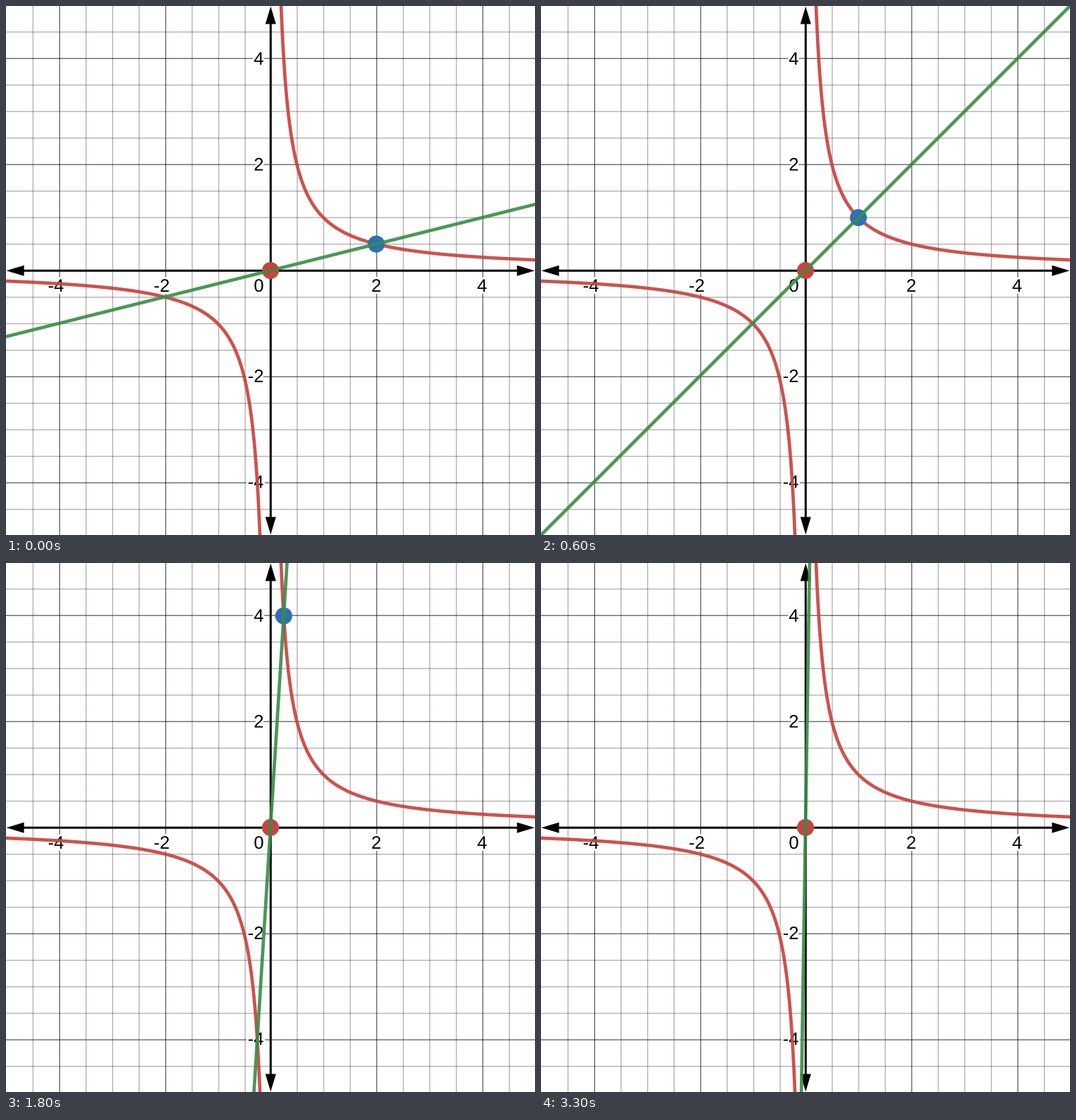
These frames come from a looping animation (748x748 px, 3900 ms). A matplotlib script:

```python
import math

import numpy as np
import matplotlib.pyplot as plt
from matplotlib.animation import FuncAnimation
from matplotlib.patches import Circle, Polygon
from matplotlib.patheffects import withStroke

SIZE, DPI = 748, 100
MID = SIZE / 2
UNIT = SIZE / 10
SCALE = 1.5  # device pixels per layout pixel
AXIS = 249.5 * SCALE
RED, BLUE, GREEN = "#c74440", "#2d70b3", "#388c46"
SLOPES = [0.25, 1, 4, 16, 64]

plt.rcParams["text.hinting"] = "none"


def pt(px):
    """Pixels to typographic points."""
    return px * 72 / DPI


def to_px(x, y):
    return MID + UNIT * x, MID - UNIT * y


fig = plt.figure(figsize=(SIZE / DPI, SIZE / DPI), dpi=DPI, facecolor="white")
ax = fig.add_axes([0, 0, 1, 1])
ax.set(xlim=(0, SIZE), ylim=(SIZE, 0))
ax.axis("off")


def stroke(xs, ys, color, width, z, alpha=1.0):
    line, = ax.plot(xs, ys, color=color, lw=pt(width), alpha=alpha, zorder=z,
                    snap=False, solid_capstyle="butt", solid_joinstyle="round")
    return line


def draw_grid():
    for k in range(1, 10):
        alpha = 0.55 if k % 4 == 0 else 0.28
        step = 25 * k
        for x in (250.5 - step, 249.5 + step):
            stroke([x * SCALE] * 2, [0, SIZE], "black", SCALE, 1, alpha)
        for y in (249.5 - step, 249.5 + step):
            stroke([0, SIZE], [y * SCALE] * 2, "black", SCALE, 1, alpha)


def draw_axes():
    stroke([12, SIZE - 12], [AXIS, AXIS], "black", 3, 2)
    stroke([AXIS, AXIS], [12, SIZE - 12], "black", 3, 2)
    for tip, base in ((0.5, 25.5), (SIZE - 0.5, SIZE - 25.5)):
        head = np.array([[tip, AXIS], [base, AXIS - 7.5], [base, AXIS + 7.5]])
        for shape in (head, head[:, ::-1]):
            ax.add_patch(Polygon(shape, color="black", lw=0, zorder=2))


def label(value, x, baseline, align):
    ax.text(x, baseline, str(value), ha=align, va="baseline", color="black",
            zorder=3, family="Liberation Sans", fontsize=pt(25.5),
            path_effects=[withStroke(linewidth=pt(6), foreground="white")])


def draw_labels():
    label(0, 357.5, 404, "center")
    for value in (-4, -2, 2, 4):
        x, y = to_px(value, value)
        sign_shift = 4.2 if value < 0 else 0
        label(value, x - sign_shift, 404, "center")
        label(value, 364.5, y + 8.2, "right")


def draw_hyperbola():
    x = np.geomspace(0.18, 5.5, 400)
    for side in (-1, 1):
        stroke(*to_px(side * x, side / x), RED, 4.7, 4, 0.92)


draw_grid()
draw_axes()
draw_labels()
draw_hyperbola()
ax.add_patch(Circle((MID, MID), 12, color=RED, lw=0, zorder=5))
dot = ax.add_patch(Circle((MID, MID), 12, color=BLUE, lw=0, zorder=5))
ray = stroke([], [], GREEN, 4.7, 6, 0.9)


def update(frame):
    slope = SLOPES[min(frame // 2, 4)]
    root = math.sqrt(slope)
    dot.center = to_px(1 / root, root)
    reach = min(5.5, 5.5 / slope)
    ends = np.array([-reach, reach])
    ray.set_data(*to_px(ends, slope * ends))
    return dot, ray


anim = FuncAnimation(fig, update, frames=13, interval=300, repeat=True,
                     repeat_delay=0, blit=False)
plt.show()
```
